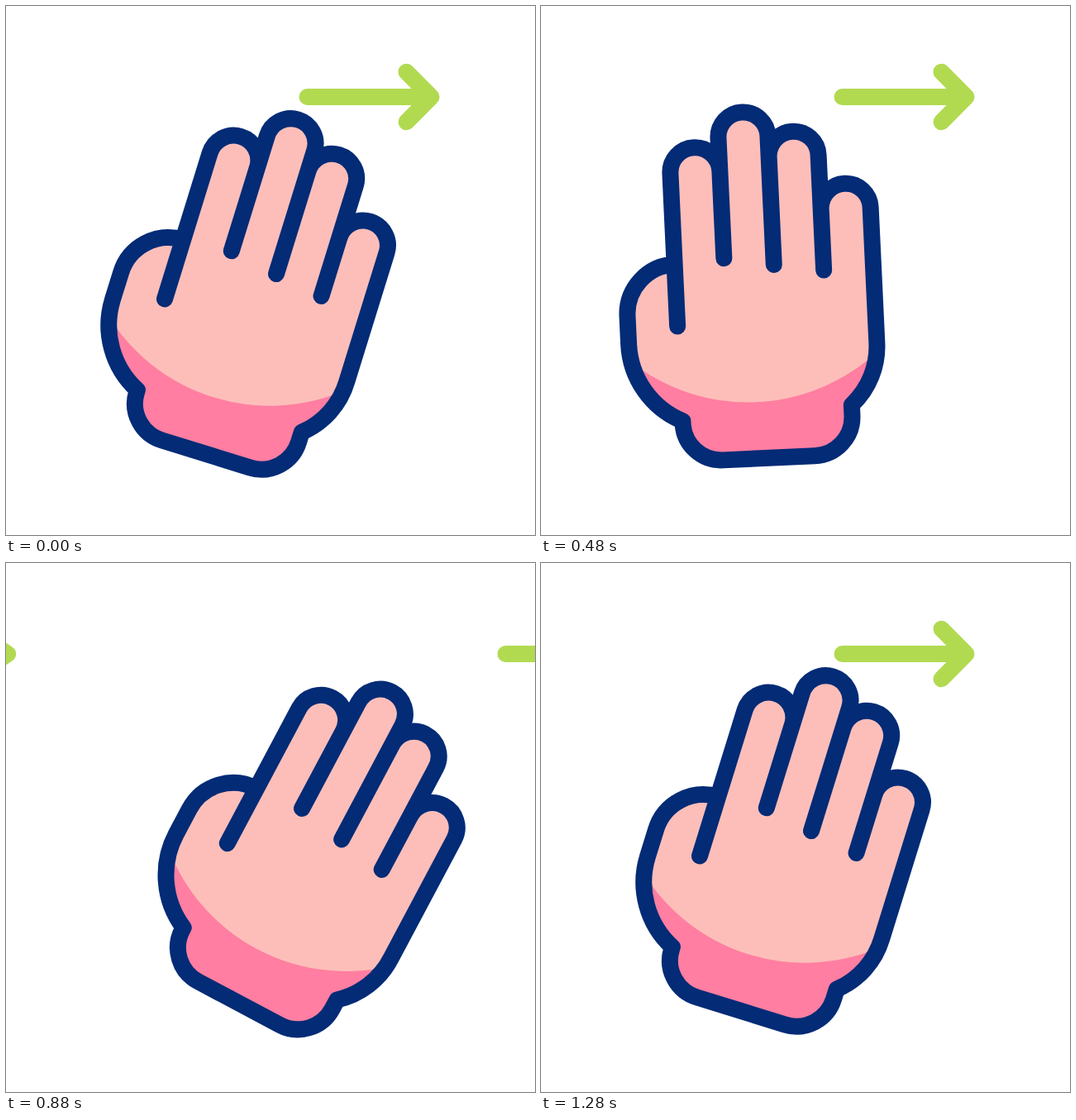
Recreate the animation shown at these times as an HTML page. Size 640 by 640 pixels, loop 1.48 s.

```html
<!DOCTYPE html>
<html lang="en">
<head>
<meta charset="utf-8">
<title>Swipe right</title>
<style>
  html, body { margin: 0; width: 100%; height: 100%; overflow: hidden; background: #fff; }
  svg { display: block; width: 100%; height: 100%; }
  path { stroke-width: 20; stroke-linecap: round; stroke-linejoin: round; }
</style>
</head>
<body>
<svg viewBox="0 0 640 640">
  <path id="arrow" fill="none" stroke="#b1da51"/>
  <g id="hand">
    <path id="skin" fill="#fdbeb9"/>
    <path id="shade" fill="#ff7ea1"/>
    <path id="outline" fill="none" stroke="#032b76"/>
  </g>
</svg>
<script>
const LOOP = 1480, STEP = 40;
const $ = id => document.getElementById(id);
const ramp = (t, from, to) => Math.min(1, Math.max(0, (t - from) / (to - from)));
const sine = u => (1 - Math.cos(Math.PI * u)) / 2;

// Lower palm and wrist, from the left edge round to the right edge
const palm = 'A106 106 0 0 0-103.6 50V53A46.5 46.5 0 0 0-57 99.3H54' +
  'A47 47 0 0 0 101.5 52.3V40A97 97 0 0 0 135.5-35';
$('shade').setAttribute('d', `M-164.5-46${palm}V-23A230 230 0 0 1-164.5-26Z`);

// Fingertips shift sideways by lean while the finger roots stay in place
function handPath(lean) {
  const tip = (x, y) => `L${x + lean} ${y + lean * .25}`;
  const finger = (x, y) => tip(x + 60, y) + 'a30 30 0 0 0-60 0';
  return `M${-104.5 + lean * .4}-140A60 60 0 0 0-164.5-80V-46${palm}` +
    finger(75.5, -198) + finger(15.5, -264) + finger(-44.5, -290) + finger(-104.5, -250) +
    'L-104.5-65' +
    'M75.5-124.5' + tip(75.5, -264) +
    'M15.5-134' + tip(15.5, -290) +
    'M-44.5-144.5' + tip(-44.5, -290);
}

function arrowPath(start, stretch) {
  const end = start + 150 + 30 * stretch;
  const barb = end - 30 - 15 * stretch;
  return `M${start} 110H${end}M${barb} 79.7L${end} 110L${barb} 140.3`;
}

function drawArrow(t) {
  let start = 364.5, stretch = 0;
  if (t < 860) {
    const out = Math.max(0, t - 610);
    start += 66 * (out / 110) ** 1.4375;
    stretch = ramp(t, 610, 940);
    $('arrow').setAttribute('d', arrowPath(start, stretch));
    return;
  }
  stretch = ramp(t, 1280, 1040);
  const left = Math.max(0, 1280 - t);
  const end = 514.5 - 271.5 * (left / 240) ** 1.243;
  let d = arrowPath(end - 150 - 30 * stretch, stretch);
  if (t < 960) d += arrowPath(364.5 + 66 * ((t - 610) / 110) ** 1.4375, ramp(t, 610, 940));
  $('arrow').setAttribute('d', d);
}

function drawHand(t) {
  const back = ramp(t, 58, 480);
  const swipe = sine(ramp(t, 606, 900));
  const settle = sine(ramp(t, 910, 1280));
  const angle = 17.2 - 19.9 * back + 31 * swipe - 11.1 * settle;
  const away = swipe - settle;
  const lean = 4 * Math.sin(Math.PI * swipe) - 14.8 * Math.sin(Math.PI * back);
  const d = handPath(lean);
  $('skin').setAttribute('d', d);
  $('outline').setAttribute('d', d);
  $('hand').setAttribute('transform',
    `translate(${272.6 + 57.7 * away} ${447.5 - 2 * away}) rotate(${angle})`);
}

function frame() {
  const t = Math.floor(performance.now() % LOOP / STEP) * STEP;
  drawArrow(t);
  drawHand(t);
  requestAnimationFrame(frame);
}
frame();
</script>
</body>
</html>
```
